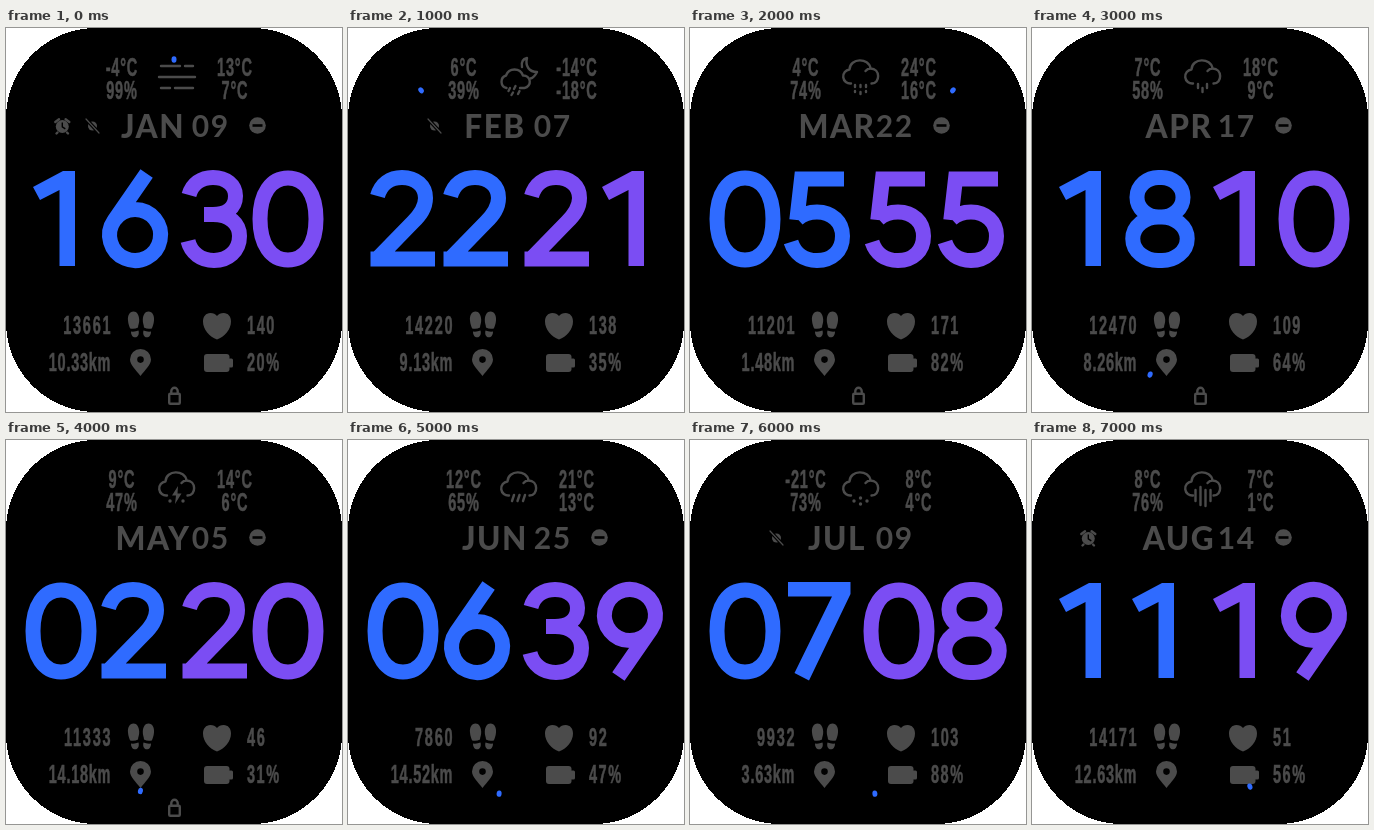
These frames come from a looping animation (336 by 384 pixels, 8 s). An HTML page:

```html
<!DOCTYPE html>
<html lang="en">
<head>
<meta charset="utf-8">
<title>Watch face</title>
<style>
html, body { margin: 0; width: 100%; height: 100%; overflow: hidden; background: #fff; }
svg { display: block; width: 100vw; height: 100vh; }
.fill { fill: #4b4b4b; }
.line { fill: none; stroke: #4b4b4b; stroke-width: 2.4; stroke-linecap: round; stroke-linejoin: round; }
.cut { fill: none; stroke: #000; }
.big { stroke-width: 15; }
.date { font: 700 30px Lato, "Open Sans", sans-serif; fill: #4b4b4b; text-anchor: middle; }
.month { font-size: 31.5px; font-weight: 800; }
.small { font: 700 25px "Liberation Sans", Arial, sans-serif; fill: #4b4b4b; stroke: #4b4b4b; stroke-width: .6; }
</style>
</head>
<body>
<svg viewBox="0 0 336 384">
  <rect width="336" height="384" rx="90" fill="#000" shape-rendering="crispEdges"/>
  <g id="weather"></g>
  <g id="time"></g>
  <g id="labels"></g>

  <g class="fill">
    <path id="foot" d="M127.500 283.500C123.500 283.500 121.500 287.500 122 292.500C122.300 296 123.300 298.500 124.200 300.500Q128.500 301.500 132 299.500C132 297 133.400 295 133.200 291.500C132.900 287 131 283.500 127.500 283.500ZM125 303.500Q129 304 132.500 302.500C133.500 306 132 309.300 129.300 309.300C126.500 309.300 125 307 125 303.500Z"/>
    <use href="#foot" transform="translate(270 0) scale(-1 1)"/>
    <path d="M211 311.500C203.500 309 197 301.500 197 293.500C197 288.500 200 285 204.300 285C207.300 285 209.500 286 211 288C212.500 286 214.700 285 217.700 285C222 285 225 288.500 225 293.500C225 301.500 218.500 309 211 311.500Z"/>
    <path fill-rule="evenodd" d="M134.500 348C130 342 124 337 124 331.500A10.500 10.500 0 0 1 145 331.500C145 337 139 342 134.500 348ZM134.500 328.300A3.300 3.300 0 1 0 134.500 334.900A3.300 3.300 0 1 0 134.500 328.300Z"/>
    <rect x="198" y="326" width="25.500" height="18" rx="3"/>
    <rect x="222" y="330.500" width="5" height="9" rx="1.500"/>
  </g>

  <g id="alarm">
    <circle class="fill" cx="56.300" cy="98.500" r="6.500"/>
    <path class="line" d="M49.300 94L53 91.300M63.300 94L59.600 91.300M51.500 104.500L50.500 105.500M61 104.500L62 105.500"/>
    <path class="cut" stroke-width="1.400" d="M56.300 94.500V98.800L59.300 100.800"/>
  </g>
  <g id="link">
    <circle class="fill" cx="86.500" cy="98" r="4.500"/>
    <path class="cut" stroke-width="3.500" d="M80 91L93 105"/>
    <path class="line" style="stroke-width:1.200" d="M80 91L93 105"/>
  </g>
  <g id="quiet">
    <circle class="fill" cx="251.500" cy="97.500" r="8.300"/>
    <path class="cut" stroke-width="2.600" d="M246.500 97.500H256.500"/>
  </g>
  <g id="lock">
    <rect class="line" x="163.200" y="365.700" width="10.600" height="10" rx="1"/>
    <path class="line" d="M165.300 365.700V363A3.200 3.200 0 0 1 171.700 363V365.700"/>
  </g>
  <ellipse id="second" cx="168" cy="31.500" rx="2.500" ry="3.200" fill="#2f6bff"/>
</svg>

<script>
const $ = id => document.getElementById(id);
const BLUE = '#2f6bff', PURPLE = '#7b4df3';
const columns = [19, 92, 173, 246];

// Digits in a 72-wide cell; "solid" shapes are filled, the others stroked.
const solid = {
  1: 'M8 159L38 143H50V238H34.500V162L15 172Z',
  7: 'M6 142H68.500V154L27 240.500L12.500 233L50 156.500H6Z'
};
const stroked = {
  0: 'M8 191C8 165.500 19 150 36 150S64 165.500 64 191S53 232 36 232S8 216.500 8 191Z',
  2: 'M10.500 168C14 156 23 149.500 35 149.500C49 149.500 58.500 158 58.500 170C58.500 180 53 187 46 194L9 232M3.500 231H68',
  3: 'M10 167C13 156 22 149.500 34 149.500C47 149.500 56.500 157 56.500 168C56.500 180 47 186.500 34 186.500H25M34 186.500C51 186.500 60.500 196 60.500 208C60.500 223 49 232.500 35 232.500C22 232.500 12 225 9 213',
  5: 'M62 151H19.500L14.800 192M15.500 191C21 186 28 184 35 184C50 184 60.500 194 60.500 208C60.500 223 50 232.500 35 232.500C22 232.500 13 226 9 214',
  6: 'M48.600 145.600L16.100 192.500A25.500 25.500 0 1 0 37 181.500A25.500 25.500 0 0 0 16.100 192.500',
  8: 'M36 149.500A21.500 19.800 0 1 0 36 189A21.500 19.800 0 1 0 36 149.500ZM36 189A25.500 21.800 0 1 0 36 232.500A25.500 21.800 0 1 0 36 189Z',
  9: 'M24.400 236.400L56.900 189.500A25.500 25.500 0 1 0 36 200.500A25.500 25.500 0 0 0 56.900 189.500'
};

const line = d => `<path class="line" d="${d}"/>`;
const dots = list => list.map(([x, y]) => `<circle class="fill" cx="${x}" cy="${y}" r="1.700"/>`).join('');
const cloud = line('M161 55.500A7 7 0 0 1 159.500 41.500C160 29.500 179 29.500 180.500 40.500C190.500 40.500 190.500 55.500 181.500 55.500M175.500 43Q177.500 40.500 180.500 40.500');
const sky = {
  fog: line('M155 38H174M179 38H187M153 49H189M155 60H164M169 60H187'),
  night: line('M158.500 60A6.500 6.500 0 0 1 158 47.500A9 9 0 0 1 175 47.500A6.300 6.300 0 0 1 176.500 60H172') +
    line('M174 39C173 34 175 31 179 30C177 38 181 44 189 44C187 48 185 50 182.500 50.500') +
    line('M162 60L160.500 63M167.500 58L166 61M165 64.500L163.500 67M171.500 63L170 66'),
  hail: cloud + line('M165 57V59M170.500 57V59M176 57V59M165 63V64M170.500 64V66M176 63V64'),
  drizzle: cloud + line('M166 56V60M175 56V60M170.500 60V64'),
  thunder: cloud + '<path class="fill" d="M172 46L166 55.500H170L169 64L175.500 53.500H171.500Z"/>' + dots([[164, 61], [177, 61]]),
  rain: cloud + line('M166 55L164 61M171.500 55L169.500 61M177 55L175 61'),
  snow: cloud + dots([[164, 61], [170.5, 58], [170.5, 64], [177, 61]]),
  shower: cloud + line('M163.500 50V61M168.500 47V65M173.500 50V66M178.500 50V61')
};

// time, month, day, sky, temperature, humidity, high, low, steps, km, pulse, power, icons, second
const scenes = [
  ['1630', 'JAN', '09', 'fog', '-4', '99', '13', '7', '13661', '10.33', '140', '20', 'alarm link quiet lock', 0],
  ['2221', 'FEB', '07', 'night', '6', '39', '-14', '-18', '14220', '9.13', '138', '35', 'link', 54],
  ['0555', 'MAR', '22', 'hail', '4', '74', '24', '16', '11201', '1.48', '171', '82', 'quiet lock', 6],
  ['1810', 'APR', '17', 'drizzle', '7', '58', '18', '9', '12470', '8.26', '109', '64', 'quiet lock', 33],
  ['0220', 'MAY', '05', 'thunder', '9', '47', '14', '6', '11333', '14.18', '46', '31', 'quiet lock', 32],
  ['0639', 'JUN', '25', 'rain', '12', '65', '21', '13', '7860', '14.52', '92', '47', 'quiet', 31],
  ['0708', 'JUL', '09', 'snow', '-21', '73', '8', '4', '9932', '3.63', '103', '88', 'link', 29],
  ['1119', 'AUG', '14', 'shower', '8', '76', '7', '1', '14171', '12.63', '51', '56', 'alarm quiet', 27]
];

function digit(n, i) {
  const color = i < 2 ? BLUE : PURPLE;
  const paint = solid[n] ? `fill="${color}"` : `class="big" fill="none" stroke="${color}"`;
  return `<path ${paint} transform="translate(${columns[i]} 0)" d="${solid[n] || stroked[n]}"/>`;
}

const NARROW = 0.58;
function small(text, x, y, anchor, gap) {
  const shift = { start: 0, middle: 0.5, end: 1 }[anchor] * gap * NARROW;
  return `<text class="small" letter-spacing="${gap}" text-anchor="${anchor}" ` +
    `transform="translate(${x + shift} ${y}) scale(${NARROW} 1)">${text}</text>`;
}

const dayDigit = (text, x) => `<text class="date" x="${x}" y="109.300">${text}</text>`;

let shown = -1;
function draw(ms) {
  const index = Math.floor(ms / 1000) % scenes.length;
  if (index === shown) return;
  shown = index;
  const [time, month, day, weather, temp, humidity, high, low, steps, km, pulse, power, icons, sec] = scenes[index];
  $('weather').innerHTML = sky[weather];
  $('time').innerHTML = [...time].map(digit).join('');
  $('labels').innerHTML =
    `<text class="date month" x="147" y="110" letter-spacing="1.500">${month}</text>` +
    dayDigit(day[0], 194.5) + dayDigit(day[1], 213.5) +
    small(temp + '°C', 115.5, 47.7, 'middle', 1.4) +
    small(humidity + '%', 115.5, 70.7, 'middle', 1.4) +
    small(high + '°C', 228.5, 47.7, 'middle', 1.4) +
    small(low + '°C', 228.5, 70.7, 'middle', 1.4) +
    small(steps, 104.5, 306, 'end', 3) +
    small(km + 'km', 104.5, 343, 'end', 1.3) +
    small(pulse, 241, 306, 'start', 2.8) +
    small(power + '%', 241, 343, 'start', 2.6);
  for (const id of ['alarm', 'link', 'quiet', 'lock'])
    $(id).style.display = icons.includes(id) ? '' : 'none';
  $('second').setAttribute('transform', `rotate(${sec * 6} 168 193)`);
}

function tick() {
  draw(performance.now());
  requestAnimationFrame(tick);
}
draw(0);
requestAnimationFrame(tick);
</script>
</body>
</html>
```
